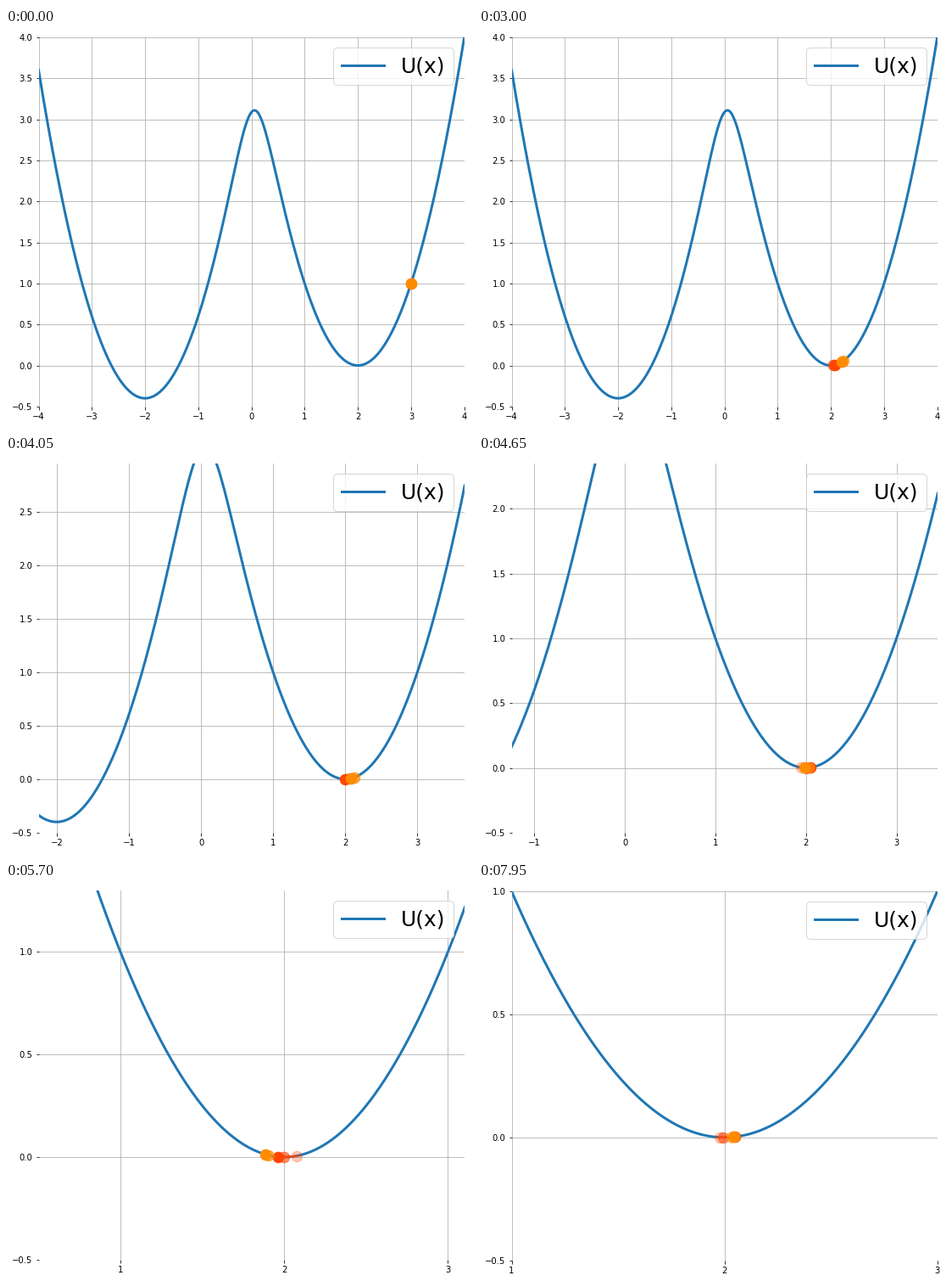
These frames come from a looping animation (551 px wide and 470 px high, 8 s). A matplotlib script:

```python
import numpy as np
import matplotlib.pyplot as plt
from matplotlib.animation import FuncAnimation

WIDTH, HEIGHT, DPI = 551, 470, 72
TICK_MS, TICKS_PER_STEP, TICKS = 50, 3, 160
STEPS = 54
ZOOM_START, ZOOM_END = 20, 40
TRAIL_ALPHAS = (0.3, 0.6, 1.0)

plt.rcParams["font.family"] = "DejaVu Sans"


def potential(x):
    """Soft minimum of two parabolic wells."""
    return -np.logaddexp(-(x - 2) ** 2, 0.4 - (x + 2) ** 2)


def noisy_descent(offset, swing, peak, period, seed):
    """Relaxation from x = 3 into the well at x = 2, then jittery wandering."""
    steps = np.arange(STEPS)
    wander = offset + swing * np.cos(2 * np.pi * (steps - peak) / period)
    wander += np.random.default_rng(seed).normal(0, 0.015, STEPS)
    return 2 + np.exp(-steps / 8) + wander * (1 - np.exp(-steps / 4))


class Particle:
    def __init__(self, ax, path, color):
        self.path = path
        self.dots = [ax.plot([], [], "o", ms=12.5, color=color, alpha=alpha)[0]
                     for alpha in TRAIL_ALPHAS]
        self.trace, = ax.plot([], [], color=color, lw=2)

    def show(self, step):
        recent = self.path[np.maximum(step + np.arange(-2, 1), 0)]
        heights = potential(recent)
        self.trace.set_data(recent, heights)
        for age, (dot, x, y) in enumerate(zip(self.dots, recent, heights)):
            visible = step >= 2 - age
            dot.set_data([x] if visible else [], [y] if visible else [])


fig = plt.figure(figsize=((WIDTH + 1e-6) / DPI, (HEIGHT + 1e-6) / DPI),
                 dpi=DPI, facecolor="white")
ax = fig.add_axes([0, 0, 1, 1])
ax.spines[:].set_visible(False)
ax.grid(True)
ax.set_xticks(range(-4, 5))
y_ticks = np.linspace(-0.5, 4, 10)
ax.set_yticks(y_ticks, [f"{y:.1f}".replace("-", "\u2212") for y in y_ticks])

xs = np.linspace(-4, 4, 1001)
ax.plot(xs, potential(xs), lw=3, label="U(x)")
ax.legend(loc="upper right", fontsize=25)

red_path = noisy_descent(offset=0.03, swing=0.08, peak=44.5, period=10.7, seed=4)
orange_path = noisy_descent(offset=0, swing=0.13, peak=20, period=40, seed=9)
particles = [Particle(ax, red_path, "orangered"),
             Particle(ax, orange_path, "darkorange")]


def update(tick):
    step = tick // TICKS_PER_STEP
    zoom = min(max(step - ZOOM_START, 0), ZOOM_END - ZOOM_START)
    ax.set_xlim(-4 + 0.25 * zoom, 4 - 0.05 * zoom)
    ax.set_ylim(-0.5, 4 - 0.15 * zoom)
    # The plot sits one pixel higher while no label touches its top edge.
    lift = 1 if ZOOM_START < step < ZOOM_END else 0
    ax.set_position([38.5 / WIDTH, (24.17 + lift) / HEIGHT,
                     502.2 / WIDTH, 434.88 / HEIGHT])
    for particle in particles:
        particle.show(step)


anim = FuncAnimation(fig, update, frames=TICKS, interval=TICK_MS,
                     init_func=lambda: update(0), repeat=True, repeat_delay=0)
plt.show()
```
